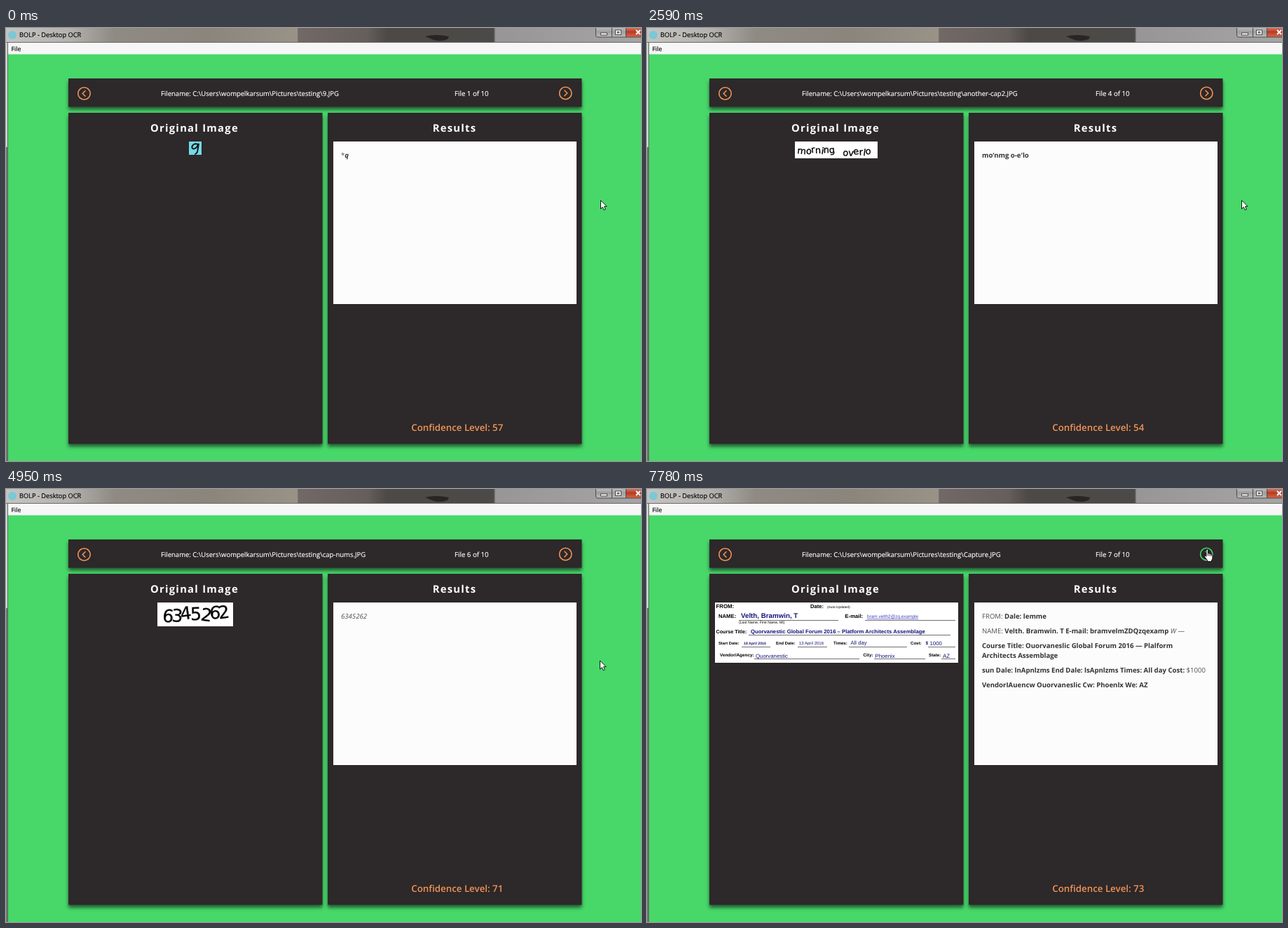
These frames come from a looping animation (906 by 618 pixels, 8000 ms). An HTML page:

```html
<!DOCTYPE html>
<html lang="en">
<head>
<meta charset="utf-8">
<title>Desktop OCR</title>
<style>
  html, body { margin: 0; width: 906px; height: 618px; overflow: hidden; background: #47d869; }
  svg { display: block; font-family: "Open Sans", "Noto Sans", sans-serif; text-rendering: geometricPrecision; }
  .panel { fill: #2d2829; filter: drop-shadow(0 4px 2.5px rgba(20, 40, 30, .7)); }
  .heading { font-weight: 700; font-size: 14.8px; letter-spacing: 1.25px; fill: #fff; }
  .bar { font-weight: 500; fill: #fff; stroke: #fff; stroke-width: .15; }
  .result { font-size: 9.6px; fill: #505050; }
  .result .b { fill: #333; }
  .b { font-weight: 700; }
  .i { font-style: italic; }
  .arial { font-family: "Liberation Sans", Arial, sans-serif; }
  .print { stroke: #000; stroke-width: .2; }
  .scrawl { font-family: "DejaVu Sans", sans-serif; stroke: #000; stroke-width: .3; }
  .navy { fill: #16167e; }
  .ring { fill: none; stroke: #ef9559; stroke-width: 1.6; stroke-linecap: round; stroke-linejoin: round; }
</style>
</head>
<body>
<svg width="906" height="618" viewBox="0 0 906 618">
  <defs>
    <linearGradient id="glass">
      <stop offset="0" stop-color="#c4c4c2"/><stop offset=".1" stop-color="#b4b2ae"/>
      <stop offset=".17" stop-color="#8f8a83"/><stop offset=".32" stop-color="#8b857c"/>
      <stop offset=".459" stop-color="#999287"/><stop offset=".46" stop-color="#726967"/>
      <stop offset=".57" stop-color="#655e5b"/><stop offset=".6" stop-color="#4c4946"/>
      <stop offset=".768" stop-color="#4c4a48"/><stop offset=".771" stop-color="#979595"/>
      <stop offset="1" stop-color="#a6a4a4"/>
    </linearGradient>
    <linearGradient id="grey" x2="0" y2="1">
      <stop offset="0" stop-color="#c5c5c5"/><stop offset=".5" stop-color="#9d9d9d"/><stop offset="1" stop-color="#bdbdbd"/>
    </linearGradient>
    <linearGradient id="red" x2="0" y2="1">
      <stop offset="0" stop-color="#dc8b78"/><stop offset=".5" stop-color="#b93a22"/><stop offset="1" stop-color="#d66a4b"/>
    </linearGradient>
  </defs>

  <rect width="906" height="618" fill="#47d869"/>
  <rect width="906" height="22" fill="url(#glass)"/>
  <path d="M598 12q14 -4 34 0l-2 4q-10 4 -20 1z" fill="#292525"/>
  <path d="M0 20.5H906" stroke="#6b6966"/>
  <rect y="21" width="906" height="16.5" fill="#f6f6f6"/>
  <path d="M1 21V170" stroke="#d5d5d5" stroke-width="2"/>
  <path d="M1 170V618" stroke="#77756e" stroke-width="2"/>
  <path d="M2.5 21V618" stroke="#4b6b52"/>
  <circle cx="9" cy="10" r="6" fill="#7cc8d4"/>
  <text x="19" y="13.4" font-size="9.25" stroke="#000" stroke-width=".15">BOLP - Desktop OCR</text>
  <text x="7.5" y="32.5" font-size="8.8" stroke="#000" stroke-width=".15">File</text>

  <g stroke="#4c4c4c">
    <path d="M841.5 -2V10q0 3 3 3H884.5V-2z" fill="url(#grey)"/>
    <path d="M884.5 -2V13H908V-2z" fill="url(#red)"/>
    <path d="M864.5 0V13"/>
    <rect x="848.5" y="7" width="9" height="3" fill="#fff"/>
    <rect x="869.5" y="3" width="8" height="6.5" fill="#fff"/>
    <rect x="872" y="5.2" width="3" height="2" fill="#888" stroke-width=".7"/>
  </g>
  <path d="M899 3l6 6M905 3l-6 6" stroke="#fff" stroke-width="2"/>

  <rect class="panel" x="89" y="72" width="732.5" height="40.5"/>
  <rect class="panel" x="89" y="121" width="362.5" height="472.5"/>
  <rect class="panel" x="459" y="121" width="362.5" height="472.5"/>
  <text class="heading" x="206" y="148">Original Image</text>
  <text class="heading" x="608.7" y="148">Results</text>
  <rect x="467" y="162" width="347" height="232" fill="#fcfcfc"/>
  <g class="ring"><circle cx="111.5" cy="93.5" r="8.7"/><path d="M113 89.7l-3.8 3.8 3.8 3.8"/></g>
  <g class="ring" id="next"><circle cx="798.3" cy="93" r="8.7"/><path d="M797 89.2l3.8 3.8 -3.8 3.8"/></g>

  <g id="page"></g>

  <g id="pointer" stroke="#000" fill="#fff" stroke-width=".9" stroke-linejoin="round">
    <path id="arrow" d="M.5 .5V12.6L3.3 10 5.2 14.3 7.3 13.4 5.5 9.2H9.2z"/>
    <path id="hand" d="M3 10V1.8q0 -1.3 1.2 -1.3t1.2 1.3V6.5q2 -1 2.4 .6 1.7 -.7 2.1 .7 2 -.4 2 1.3V13q0 2 -1.4 3.2V18H4.7V16.4L.8 11.6q-.8 -1.5 .3 -1.9 .9 -.3 1.9 1.1zM5.4 6.5V10M7.8 7.1V10.2M9.9 7.8V10.4"/>
  </g>
</svg>
<script>
const $ = id => document.getElementById(id);
const text = (x, y, size, str, cls = '', more = '') =>
  `<text x="${x}" y="${y}" font-size="${size}" class="${cls}" ${more}>${str}</text>`;
const paper = (x, y, w, h, fill = '#fff') => `<rect x="${x}" y="${y}" width="${w}" height="${h}" fill="${fill}"/>`;
const bold = s => `<tspan class="b">${s}</tspan>`;
const italic = s => `<tspan class="i">${s}</tspan>`;
const label = (x, y, size, str) => text(x, y, size, str, 'arial b');
const entry = (x, y, size, str, cls = '') => text(x, y, size, str, 'arial navy ' + cls);
const rule = (x1, x2, y) => `<path d="M${x1} ${y}H${x2}" stroke="#333" stroke-width=".7"/>`;

// Wobbly lettering: each glyph gets its own tilt and height.
const scrawl = (x, y, size, str, slope = 0, step = 0) => {
  const glyphs = [...str];
  const list = f => glyphs.map((_, i) => f(i).toFixed(1)).join(' ');
  const xs = step ? list(i => x + i * step) : x;
  return text(xs, list(i => y + i * slope + Math.sin(i * 2.1) * .8), size, str, 'scrawl',
    `rotate="${list(i => Math.sin(i * 1.7 + 1) * 8)}"`);
};

const nine = paper(261, 162, 18, 19, '#73d9e5') +
  '<path d="M274 167q-2 -3 -6 -1 -4 3 -2 6 4 2 8 -5 1 -2 1 -2l-2 12q-1 2 -3 3" fill="none" stroke="#111" stroke-width="1.9" stroke-linecap="round"/>';

const address = paper(154, 162, 231.5, 71) +
  ['Downtown Golden, CO in the', 'parking lot on the corner of 12th', 'and Brumdale Street', 'Golden, CO 80976']
    .map((s, i) => text(384, 183.7 + i * 15.5, 15.5, s, 'arial', 'text-anchor="end"')).join('');

const notice = paper(97, 162, 347, 56) + [
  'If you need IMMEDIATE or EMERGENCY help for medical, mental health, or',
  'crisis concerns, you can call 707 or contact the Harbours Relief Line at',
  '1-800-555-0142 and press 1. You do not need to be enrolled in the MB to access',
  'IMMEDIATE help from your local 707 Center or the Harbours Relief Line.'
].map((s, i) => text(98, 171.7 + i * 11.7, 9.38, s, 'arial print')).join('');

const form = paper(97, 162, 347, 86) +
  label(98.5, 170, 7.8, 'FROM:') + label(233, 170, 7.6, 'Date:') + text(257, 170, 4.8, '(Auto-Updated)', 'arial') +
  label(102, 184, 7.7, 'NAME:') + entry(134, 184, 9.75, 'Velth, Bramwin, T', 'b') + rule(131, 273, 187.5) +
  text(131, 192, 5.2, '(Last Name, First Name, MI)', 'arial') +
  label(282.5, 184, 7.7, 'E-mail:') +
  text(314, 184, 6.45, 'bram.velth2@zq.example', 'arial', 'fill="#3d3dc0" text-decoration="underline"') + rule(311, 440, 187.5) +
  label(98.5, 205.5, 7.2, 'Course Title:') +
  entry(148, 205.5, 7.75, 'Quorvanestic Global Forum 2016 – Platform Architects Assemblage', 'b') + rule(145, 433, 208.5) +
  label(102, 222, 5.8, 'Start Date:') + entry(138, 222, 5.2, '18 April 2016', 'b') + rule(135, 176, 225.5) +
  label(184, 222, 5.9, 'End Date:') + entry(217, 221.5, 6, '13 April 2016') + rule(215, 257, 225.5) +
  label(266, 222, 6.2, 'Times:') + entry(290.5, 222, 7.7, 'All day') + rule(288, 371, 225.5) +
  label(376, 222, 6.1, 'Cost:') + entry(397.5, 221.5, 6.5, '$', 'b') + entry(403.5, 223, 7.8, '1000') + rule(401, 440, 225.5) +
  label(104, 239, 6.4, 'Vendor/Agency:') + entry(155, 241, 7.8, 'Quorvanestic') + rule(153, 303, 242.5) +
  label(308.5, 239, 6.3, 'City:') + entry(325.5, 241, 7.8, 'Phoenix') + rule(324, 397, 242.5) +
  label(402, 239, 6.2, 'State:') + entry(422, 241, 8, 'AZ') + rule(420, 440, 242.5);

// Each page: start time, file number, file name, confidence, picture, result lines as [baseline, text].
const pages = [
  [0, 1, '9', 57, nine, [[185, '*' + italic(bold('q'))]]],
  [130, 2, 'address', 78, address, [
    [185, 'Downtown Golden, CO in the parkmg lot on the corner of 12th and'],
    [199, 'Brumdale ' + bold('Street')],
    [220, 'Golden, CO 80976']]],
  [1910, 3, 'another-cap', 51,
    paper(209, 162, 122.5, 24) + scrawl(211, 178, 13, 'Levelers') + scrawl(272, 183, 14.3, 'critics', -.2),
    [[185, bold("“3W5 q-‘n'cs")]]],
  [2590, 4, 'another-cap2', 54,
    paper(211, 162, 118, 24) + scrawl(214, 179, 13, 'morning') + scrawl(279, 182, 13, 'overlo', -.2),
    [[185, bold("mo‘nmg o-e'lo")]]],
  [3310, 5, 'another test', 85, notice, [
    [185, 'If you need IMMEDIATE or EMERGENCY help for medical, mental health,'],
    [199, `or crisis concerns, you can call 707 or Contact the Harbours ${bold('Relief')} Line at`],
    [213, '1-800-555-0142 and press 1. You do not need to be enrolled in the MB'],
    [227, 'to access IMMEDIATE help from your local 707 Center or the Harbours'],
    [241, 'Relief Line.']]],
  [4950, 6, 'cap-nums', 71,
    paper(216, 162, 108, 34) + scrawl(222.5, 189, 25, '6345262', -.6, 13.6),
    [[185, italic('6345262')]]],
  [6480, 7, 'Capture', 73, form, [
    [185, 'FROM: ' + bold('Dale: lemme')],
    [206, `NAME: ${bold('Velth. Bramwin. T E-mail: bramvelmZDQzqexamp')} ${italic('W')} —`],
    [227, bold('Course Title: Ouorvaneslic Global Forum 2016 — Plalform')],
    [241, bold('Architects Assemblage')],
    [262, bold('sun Dale: lnApnlzms End Dale: lsApnlzms Times: All day Cost:') + ' $1000'],
    [283, bold('VendorIAuencw Ouorvaneslic Cw: Phoenlx We: AZ')]]]
];

// Pointer stops: start time, shape, x, y, colour of the next button.
const orange = '#ef9559', green = '#47d869';
const stops = [
  [0, 'arrow', 848, 245.5, orange],
  [4670, 'arrow', 847, 244.5, orange],
  [7240, 'arrow', 830, 175.5, orange],
  [7380, 'hand', 784, 78, '#9bb661'],
  [7500, 'hand', 784, 78, green],
  [7650, 'hand', 790, 82, green],
  [7780, 'hand', 795, 85.5, green]
];

const current = (list, t) => list.findLast(item => item[0] <= t);

function showPage([, number, name, confidence, picture, lines]) {
  $('page').innerHTML = picture +
    text(221, 97, 9.5, `Filename: C:\\Users\\wompelkarsum\\Pictures\\testing\\${name}.JPG`, 'bar') +
    text(640, 97, 9.7, `File ${number} of 10`, 'bar') +
    lines.map(([y, s]) => text(478, y, 9.6, s, 'result')).join('') +
    text(578.3, 574.5, 13.3, `Confidence Level: ${confidence}`, '', 'fill="#ef9559" font-weight="600"');
}

function showPointer([, shape, x, y, colour]) {
  $('arrow').style.display = shape === 'arrow' ? '' : 'none';
  $('hand').style.display = shape === 'hand' ? '' : 'none';
  $('pointer').setAttribute('transform', `translate(${x} ${y})`);
  $('next').style.stroke = colour;
}

let page, stop;
const start = performance.now();
function frame() {
  const t = (performance.now() - start) % 8000;
  const nextPage = current(pages, t), nextStop = current(stops, t);
  if (nextPage !== page) showPage(page = nextPage);
  if (nextStop !== stop) showPointer(stop = nextStop);
  requestAnimationFrame(frame);
}
frame();
</script>
</body>
</html>
```
